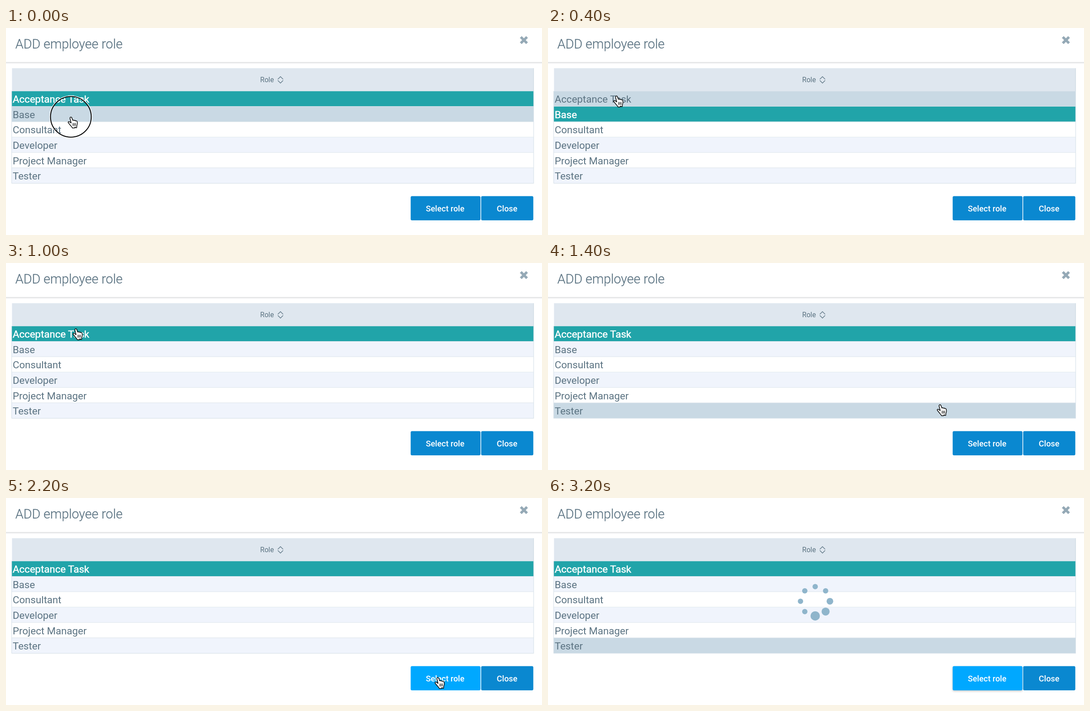
Recreate the animation shown at these times as an HTML page. Size 1202x466 px, loop 3.4 s.

```html
<!DOCTYPE html>
<html lang="en">
<head>
<meta charset="utf-8">
<title>Add employee role</title>
<style>
  html, body { margin: 0; width: 100%; height: 100%; overflow: hidden; background: #fff; }
  svg { display: block; width: 100vw; height: 100vh; }
  text { font-family: Roboto, Arial, sans-serif; fill: #5b7382; }
  .title { font-size: 29px; font-weight: 300; stroke: #5b7382; stroke-width: .3px; }
  .head { font-size: 15.7px; }
  .row text { font-size: 22.6px; }
  .row.selected text { fill: #fff; stroke: #fff; stroke-width: .5px; }
  .button text { font-size: 18.3px; font-weight: 500; fill: #fff; text-anchor: middle; }
  .raised { filter: drop-shadow(0 2px 2px rgba(0, 0, 0, .22)); }
</style>
</head>
<body>
<svg viewBox="0 0 1202 466">
  <rect width="1202" height="466" fill="#fff"/>
  <text class="title" x="21" y="45.5">ADD employee role</text>
  <path d="M1154.4 20.2l14 14m0-14l-14 14" stroke="#95a9b6" stroke-width="5.8"/>
  <rect y="76.5" width="1202" height="3" fill="#e5e6e7"/>

  <rect x="13.5" y="90.5" width="1170" height="52" fill="#dfe7ef"/>
  <path d="M1183 90.5v52" stroke="#c8d5de"/>
  <text class="head" x="570" y="122">Role</text>
  <path d="M609.5 115.5l6-6 6 6m-12 2.5l6 6 6-6" fill="none" stroke="#5b7382" stroke-width="1.3"/>

  <g id="rows"></g>
  <path d="M12.7 142v208M1183.3 142v208" stroke="#d9e3ea" stroke-width="1.2"/>

  <g class="button" id="select">
    <rect x="907.5" y="378.5" width="156.5" height="54.5" rx="3"/>
    <text x="984.8" y="413">Select role</text>
  </g>
  <g class="button">
    <rect x="1065.5" y="378.5" width="117" height="54.5" rx="3" fill="#0a88d0"/>
    <text x="1123.7" y="413">Close</text>
  </g>

  <g id="spinner" fill="#8fb5cb"></g>

  <g id="pointer">
    <g id="ring" fill="none">
      <circle r="47.2" stroke="#fff" stroke-width="1.6"/>
      <circle r="45.7" stroke="#000" stroke-width="2"/>
    </g>
    <g transform="translate(-7 -.5)" stroke="#000" stroke-linecap="round" stroke-linejoin="round">
      <path fill="#fff" stroke-width="1.5" d="M5 2.7C5.4.6 8.2.4 9 2.4l2.3 6c.9-.9 2.7-.6 3.2.5.9-.8 2.6-.5 3.1.8 1.2-.7 3.1-.1 3.6 1.9.7 3 .6 5.3-.5 7.7-.7 1.8-.7 3.2-.7 5.7h-2.5l-1-1.5-1.5 2.3h-4.5C9.5 23 7 21 5 18.5L1.2 13.8c-1.1-1.8.6-3.3 2.5-2.3L7.6 14.3 5.2 5Z"/>
      <path fill="none" stroke-width="1.2" d="M11.8 15v5.5m2.8-5.5v5.5m2.8-5.5v5.5"/>
    </g>
  </g>
</svg>
<script>
const LOOP = 3400, TOP = 142.3, PITCH = 34.6;
const ROLES = ["Acceptance Task", "Base", "Consultant", "Developer", "Project Manager", "Tester"];
const BLUE = "#0a88d0", MID = "#0598e8", BRIGHT = "#00a8ff";

// Each step lists only what changes from its time on.
const STEPS = [
  [0, { at: [145.5, 200], selected: 0, hover: 1, ring: true, button: BLUE, raised: false, spin: null }],
  [200, { selected: 1, hover: -1, ring: false }],
  [400, { at: [153.5, 152.5], hover: 0 }],
  [600, { at: [156.5, 147.5] }],
  [800, { ring: true }],
  [1000, { selected: 0, hover: -1, ring: false }],
  [1200, { at: [701, 245.5] }],
  [1400, { at: [879, 318.5], hover: 5 }],
  [1600, { at: [944, 379.5], hover: -1 }],
  [1800, { at: [967, 402.5], button: MID }],
  [2000, { at: [968.3, 403.7], button: BRIGHT }],
  [2600, { ring: true }],
  [2800, { ring: false, button: BLUE, raised: true, spin: { head: 1, x: 598, y: 230 } }],
  [3000, { at: null, hover: 5, button: BRIGHT, spin: { head: 2.5, x: 598.5, y: 231 } }],
  [3200, { spin: { head: 4, x: 599.2, y: 232.4 } }]
];

const $ = id => document.getElementById(id);

function add(parent, tag, attrs) {
  const el = document.createElementNS("http://www.w3.org/2000/svg", tag);
  for (const key in attrs) el.setAttribute(key, attrs[key]);
  return parent.appendChild(el);
}

const rows = ROLES.map((name, i) => {
  const y = TOP + PITCH * i;
  const group = add($("rows"), "g", { class: "row" });
  const fill = add(group, "rect", { x: 13, y, width: 1170, height: PITCH });
  add(group, "path", { d: `M13 ${y + PITCH - .3}h1170`, stroke: "#d9e3ea", "stroke-width": 1.3 });
  add(group, "text", { x: 15, y: y + 25.9 }).textContent = name;
  return { group, fill };
});

const dots = Array.from({ length: 8 }, () => add($("spinner"), "circle", {}));

// Dots shrink over three places behind the head and swell just before it arrives.
function dotRadius(lag) {
  return lag > 7 ? 10.5 - 4.5 * (8 - lag) : Math.max(6, 10.5 - 1.5 * lag);
}

function drawSpinner(spin) {
  $("spinner").style.display = spin ? "" : "none";
  if (!spin) return;
  dots.forEach((dot, i) => {
    const angle = i * Math.PI / 4;
    dot.setAttribute("cx", spin.x + 33 * Math.sin(angle));
    dot.setAttribute("cy", spin.y - 33 * Math.cos(angle));
    dot.setAttribute("r", dotRadius((spin.head - i + 8) % 8));
  });
}

function rowColor(i, state) {
  if (i === state.selected) return "#21a4a9";
  if (i === state.hover) return "#c9d9e4";
  return i % 2 ? "#f0f4fc" : "#fff";
}

function draw(time) {
  const state = Object.assign({}, ...STEPS.filter(step => step[0] <= time).map(step => step[1]));
  rows.forEach(({ group, fill }, i) => {
    group.classList.toggle("selected", i === state.selected);
    fill.setAttribute("fill", rowColor(i, state));
  });
  $("select").classList.toggle("raised", state.raised);
  $("select").firstElementChild.setAttribute("fill", state.button);
  $("pointer").style.display = state.at ? "" : "none";
  if (state.at) $("pointer").setAttribute("transform", `translate(${state.at})`);
  $("ring").style.display = state.ring ? "" : "none";
  drawSpinner(state.spin);
}

const start = performance.now();
function tick() {
  draw((performance.now() - start) % LOOP);
  requestAnimationFrame(tick);
}
tick();
</script>
</body>
</html>
```
